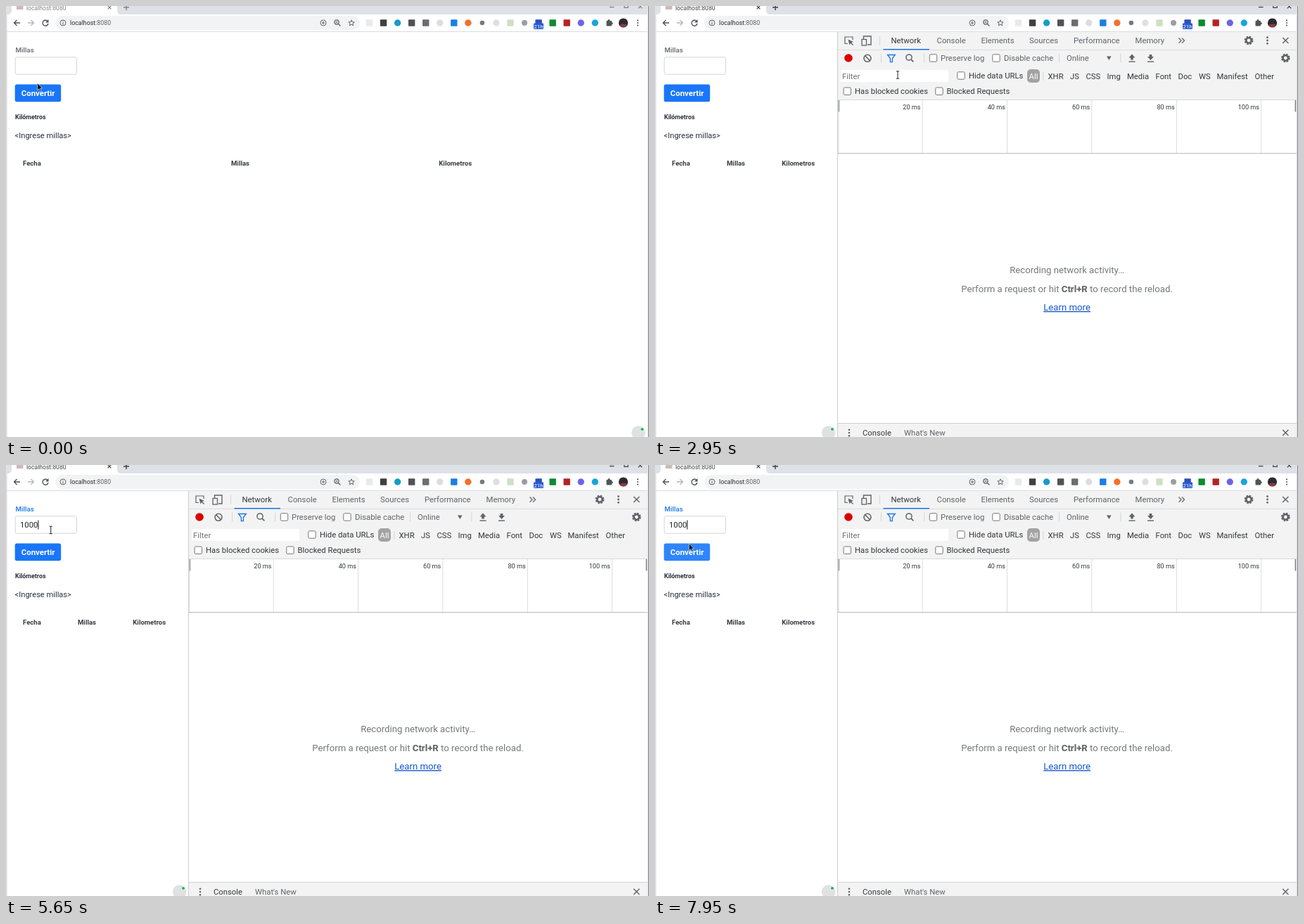
An HTML page that plays this animation: 914 by 613 pixels, repeating every 8000 ms.

```html
<!DOCTYPE html>
<html lang="es">
<head>
<meta charset="utf-8">
<title>Convertir millas</title>
<style>
  html, body { margin: 0; width: 100%; height: 100%; overflow: hidden; background: #fff; }
  svg { display: block; width: 914px; height: 613px; font-family: Roboto, "Noto Sans", sans-serif; }
  text { white-space: pre; }
</style>
</head>
<body>
<svg id="stage" viewBox="0 0 914 613"></svg>
<script>
const LOOP = 8000;
const GREY = '#5f6368', INK = '#333639', BAR = '#f3f3f3', RULE = '#cbcdd0', BLUE = '#1a73e8';
const BUTTON = '#1976f8', BUTTON_HOVER = '#2f85fb', LABEL = '#64696e', BODY = '#283039';

// Markup helpers
const text = (x, y, size, str, fill = INK, extra = '') =>
  `<text x="${x}" y="${y}" font-size="${size}" fill="${fill}" ${extra}>${str}</text>`;
const rect = (x, y, w, h, fill, extra = '') =>
  `<rect x="${x}" y="${y}" width="${w}" height="${h}" fill="${fill}" ${extra}/>`;
const circle = (x, y, r, fill, extra = '') =>
  `<circle cx="${x}" cy="${y}" r="${r}" fill="${fill}" ${extra}/>`;
const line = (d, stroke = GREY, width = 1.3, extra = '') =>
  `<path d="${d}" fill="none" stroke="${stroke}" stroke-width="${width}" ${extra}/>`;
const group = (id, body, extra = '') => `<g id="${id}" ${extra}>${body}</g>`;
const cross = (x, y, r, color = GREY, width = 1.4) =>
  line(`M${x - r} ${y - r}l${2 * r} ${2 * r}m0 ${-2 * r}l${-2 * r} ${2 * r}`, color, width);
const dots = (x, y, gap, r) => [-gap, 0, gap].map(d => circle(x, y + d, r, GREY)).join('');
const checkbox = (x, y) => rect(x - 5.2, y - 5.2, 10.4, 10.4, '#fff', 'rx="1.6" stroke="#767676" stroke-width="1"');
const gear = (x, y) => circle(x, y, 3.7, 'none', `stroke="${GREY}" stroke-width="2.6"`) +
  circle(x, y, 5.4, 'none', `stroke="${GREY}" stroke-width="2" stroke-dasharray="2.6 1.641"`);
const lens = (x, y, r, color = GREY, width = 1.4) =>
  circle(x - 1, y - 1, r, 'none', `stroke="${color}" stroke-width="${width}"`) +
  line(`M${x - 1 + r * .7} ${y - 1 + r * .7}L${x + r + 1.3} ${y + r + 1.3}`, color, width + .2);
const star = (x, y, r) => {
  const points = Array.from({ length: 10 }, (_, i) => {
    const a = i * Math.PI / 5 - Math.PI / 2, k = i % 2 ? r * .45 : r;
    return `${x + k * Math.cos(a)},${y + k * Math.sin(a)}`;
  });
  return `<polygon points="${points.join(' ')}" fill="none" stroke="${GREY}" stroke-width="1"/>`;
};

function extensions() {
  const square = (color, r = 4.7) => x => rect(x - r, 24 - r, 2 * r, 2 * r, color, 'rx="1"');
  const disc = (color, r = 4.7) => x => circle(x, 24, r, color);
  const icons = [square('#e9eaeb'), square('#3f4042'), disc('#159bc8'), square('#505254'), square('#6b6d70'),
    disc('#dcdddf'), square('#1b80e3'), disc('#f3702a'), disc('#777a7d', 3.3), disc('#dedfe0'), square('#cfe0c4'),
    disc('#9a9da1', 4), square('#2a50bd'), square('#0c8b30'), square('#b52424'), disc('#6d64e6'), disc('#18a5dc')];
  return icons.map((icon, i) => icon(516.5 + i * 20.05)).join('') +
    rect(750, 24.5, 14, 8.5, '#2a5bd0', 'rx="1"') + text(757, 31.7, 8, '21h', '#fff', 'text-anchor="middle"');
}

function browser() {
  return rect(0, 0, 914, 12, '#dee1e6') +
    '<path d="M2 12Q8 12 8 6V0H158V6Q158 12 164 12Z" fill="#fff"/>' +
    rect(15, 0, 9.5, 5, '#c9bcbd') +
    group('chrome', text(29, 5.7, 8.6, 'localhost:8080', 'currentColor') + cross(147, 2, 2.4, 'currentColor', 1.2) +
      line('M167 2H175M171 -2V6', 'currentColor', 1.4) +
      line('M858 1.7H864.5M878.8 -3V2.3H884.2V-3', 'currentColor', 1.2) + cross(901.5, .5, 2.8, 'currentColor', 1.2)) +
    rect(0, 12, 914, 24, '#fff') + rect(0, 36, 914, 1, '#dadce0') +
    rect(70, 14, 433, 20, '#f1f3f4', 'rx="10"') +
    line('M20 24H11.5M15.5 20L11.5 24L15.5 28', '#4d5156') +
    line('M31 24H39.5M35.5 20L39.5 24L35.5 28', '#b4b7ba') +
    line('M59 21.5A4 4 0 1 0 60 25', '#4d5156', 1.4) + '<path d="M60.5 19v4.4h-4.4z" fill="#4d5156"/>' +
    circle(81, 24, 4, 'none', `stroke="${GREY}"`) + line('M81 21.4v1.2M81 23.4v3', GREY, 1.1) +
    text(91, 27.3, 8.85, 'localhost<tspan fill="#5f6368">:8080</tspan>', '#2a2d31') +
    circle(451, 24, 4, 'none', `stroke="${GREY}"`) + line('M449 24h4M451 22v4', GREY, 1.1) +
    lens(471, 24, 3.1, GREY, 1.2) + line('M468.5 23h3M470 21.5v3', GREY, .8) +
    star(491, 24.3, 4.4) + extensions() +
    rect(853.5, 21, 7.5, 7.5, '#505459', 'rx="1"') + circle(857, 20.5, 1.5, '#505459') + circle(861.3, 24.7, 1.5, '#505459') +
    circle(877.5, 24, 6.6, '#2d2a33') + '<path d="M872 27.5Q877 24 883 27A6.6 6.6 0 0 1 872 27.5Z" fill="#8d3a39"/>' +
    dots(898, 24, 3.6, 1.1);
}

function page() {
  const bold = 'font-weight="700"';
  return text(13.5, 66.4, 9.7, 'Millas', LABEL, 'id="label" font-weight="500"') +
    rect(13.2, 72.8, 87.3, 24.4, '#fff', 'rx="2.5" stroke="#ced1d4" stroke-width=".9"') +
    text(20, 89, 11.3, '', '#212529', 'id="typed"') +
    rect(0, 78.5, 1, 13, '#111', 'id="caret"') +
    rect(12.7, 111.6, 65.5, 24.7, BUTTON, 'rx="2.8" id="button"') +
    text(45.6, 128, 11.4, 'Convertir', '#fff', bold + ' text-anchor="middle"') +
    text(13, 160.5, 8.9, 'Kilómetros', BODY, bold) +
    text(12.6, 188, 11.1, '&lt;Ingrese millas&gt;', BODY) +
    text(24, 226.6, 9.56, 'Fecha', '#363a3e', bold) +
    text(320, 226.6, 9.56, 'Millas', '#363a3e', bold + ' id="colMiles"') +
    text(615, 226.6, 9.56, 'Kilometros', '#363a3e', bold + ' id="colKm"') +
    group('badge', circle(0, 607, 9.8, '#dfe1e2') + circle(5.3, 602, 2.6, '#fff') + circle(5.3, 602, 2.1, '#20b45a'));
}

function devtools() {
  const tabs = [[335.5, 'Network'], [400.5, 'Console'], [463.5, 'Elements'], [532, 'Sources'], [595, 'Performance'], [682.5, 'Memory']];
  return rect(260, 37, 652, 576, '#fff') + rect(259, 37, 1, 576, RULE) +
    rect(260, 37, 652, 25, BAR) + rect(260, 62, 652, .8, RULE) +
    line('M274 53.5H270V44H281V48', GREY, 1.2) + '<path d="M274.5 47.5L282 51L279 52L282 55L281 56L278 53L276.5 55.5Z" fill="#5f6368"/>' +
    line('M296.5 47V43H307V55H302', GREY, 1.4) + rect(294, 47.5, 6.5, 8.5, BAR, `stroke="${GREY}" stroke-width="1.3"`) +
    rect(319, 43, .8, 13, RULE) + rect(324.5, 61, 65.5, 1.6, BLUE) +
    tabs.map(([x, s]) => text(x, 53, 11.35, s, x < 340 ? INK : GREY)).join('') +
    line('M744.5 45.5l3.5 3.7l-3.5 3.7M749 45.5l3.5 3.7l-3.5 3.7') +
    gear(844, 49) + dots(870.5, 49, 4.3, 1.4) + cross(896.3, 49, 4.1) +
    group('network', network()) +
    rect(260, 593, 652, 20, BAR) + rect(260, 593, 652, .9, RULE) + dots(276, 607, 4.2, 1.3) +
    text(295, 611, 11.3, 'Console') + text(354, 611, 11.3, "What's New", GREY) + cross(896.3, 606.8, 4.1);
}

function network() {
  const types = [[558.5, 'XHR'], [590, 'JS'], [612.5, 'CSS'], [642.5, 'Img'], [671, 'Media'], [711.5, 'Font'],
    [743.5, 'Doc'], [773, 'WS'], [798.5, 'Manifest'], [852.5, 'Other']];
  const arrow = (x, tip, dir) => `<path d="M${x} ${tip}l4.5 ${dir * 5}h-2.7v${dir * 3}h-3.6v${-dir * 3}h-2.7z" fill="${GREY}"/>` +
    rect(x - 4.5, 78.5, 9, 1.4, GREY);
  const ticks = [20, 40, 60, 80, 100].map((ms, i) => {
    const x = 379.7 + i * 120.4;
    return rect(x, 134, .8, 75, '#d3d5d7') + text(x - 2.2, 147, 9.15, ms + ' ms', INK, 'text-anchor="end"');
  }).join('');
  const center = (y, s, fill, extra = '') => text(585.6, y, 13.2, s, fill, 'text-anchor="middle" ' + extra);
  return rect(260, 62.8, 652, 71, BAR) +
    circle(275, 74, 5.8, '#db0000') +
    circle(302, 74.3, 5, 'none', `stroke="${GREY}" stroke-width="1.6"`) + line('M298.5 70.8l7 7', GREY, 1.6) +
    rect(321, 67.5, .8, 13, RULE) +
    line('M330.5 69.5H341.3L337.4 74.5V79.7H334.4V74.5Z', BLUE, 1.3) +
    lens(362, 74, 4.1, 'currentColor', 1.5) +
    rect(382.3, 67.5, .8, 13, RULE) +
    checkbox(395.5, 74) + text(406, 78.1, 11.3, 'Preserve log', GREY) +
    checkbox(485, 74) + text(496, 78.1, 11.3, 'Disable cache', GREY) +
    rect(574, 67.5, .8, 13, RULE) + text(585, 78.1, 11.3, 'Online', GREY) +
    `<path d="M642 71.5h6.6l-3.3 5.5z" fill="${GREY}"/>` +
    rect(661.5, 67.5, .8, 13, RULE) + arrow(678, 68.5, 1) + arrow(704.5, 77, -1) + gear(896.3, 74) +
    rect(264, 91, 153, 17, '#fff', 'id="filter"') + text(266, 104.2, 11.3, 'Filter', '#757575') +
    checkbox(435, 99) + text(446, 103, 11.3, 'Hide data URLs') +
    rect(529, 90, 18, 19, '#a3a3a3', 'rx="5"') + text(538, 104, 11.3, 'All', '#fff', 'text-anchor="middle"') +
    rect(551.5, 94, .8, 12, RULE) +
    types.map(([x, s]) => text(x, 104, 11.3, s)).join('') +
    checkbox(273.3, 121.2) + text(284, 125.2, 11.3, 'Has blocked cookies') +
    checkbox(404, 121.2) + text(414.5, 125.2, 11.3, 'Blocked Requests') +
    rect(260, 133.3, 652, .9, RULE) + rect(260, 134, 652, 75, '#fff') + ticks +
    rect(260.5, 134, 1.7, 16.5, '#818487') + rect(909.6, 134, 1.7, 16.5, '#818487') +
    rect(260.5, 134, .8, 75, RULE) + rect(260, 209, 652, 1.2, '#bec0c2') +
    center(380.4, 'Recording network activity…', '#757779') +
    center(406.6, 'Perform a request or hit <tspan font-weight="700" fill="#5d6063">Ctrl+R</tspan> to record the reload.', '#757779') +
    center(433, 'Learn more', '#1155cc', 'text-decoration="underline"');
}

const pointers =
  group('arrow', '<path d="M-.4 -.3v10l2.3 -2l1.7 3.5l1.6 -.7l-1.6 -3.4l3 -.3z" fill="#0a0a0a" stroke="#fff" stroke-width=".6"/>') +
  group('beam', line('M-2.2 -5.2H2.2M0 -5.2V5.2M-2.2 5.2H2.2', '#333', 1.1));

document.getElementById('stage').innerHTML = rect(0, 0, 914, 613, '#fff') + browser() + page() +
  group('devtools', devtools()) +
  rect(0, 12, 1.7, 601, '#dcdfe4') + rect(911.7, 12, 1.3, 601, '#dee1e6') + rect(913, 0, 1, 613, '#85888d') + pointers;

const el = id => document.getElementById(id);
const show = (id, on) => el(id).setAttribute('visibility', on ? 'inherit' : 'hidden');
const set = (id, name, value) => el(id).setAttribute(name, value);

// Pointer stops: time, x, y; the beam replaces the arrow over text fields
const stops = [
  [0, 45, 110], [850, 62, 112], [900, 105, 117], [950, 162, 124], [1000, 208, 129], [1050, 227.7, 131.7],
  [2800, 230.5, 131],
  [2950, 345, 98, 'beam'], [3100, 352, 97, 'beam'], [3250, 366, 77.5], [3400, 370, 77.5],
  [3600, 205, 105], [3700, 72, 126], [3800, 21.5, 130.5], [4000, 17, 123], [4100, 38, 113],
  [4250, 52, 102], [4500, 60, 88, 'beam'], [4750, 62, 91, 'beam'], [4850, 63.7, 92.5, 'beam'],
  [5900, 0, 0, 'none'], [6050, 56, 94, 'beam'], [6200, 50, 127], [6400, 86, 142],
  [6700, 68, 128], [6800, 54, 122], [6900, 48, 120], [7000, 60, 124],
  [7200, 291.7, 213.7], [7300, 352, 243], [7350, 396, 262], [7450, 393, 262],
  [7650, 305, 222], [7750, 180, 168], [7850, 86, 128], [7950, 48.7, 112]
];
const keys = [5150, 5250, 5400, 5500];
const within = (t, a, b) => t >= a && t < b;

function draw(t) {
  const [, x, y, kind = 'arrow'] = stops.findLast(s => s[0] <= t);
  for (const id of ['arrow', 'beam']) {
    show(id, id === kind);
    set(id, 'transform', `translate(${x} ${y})`);
  }
  const focused = t >= 1250;
  const hover = focused && kind === 'arrow' && x >= 13 && x <= 78 && y >= 112 && y <= 136;
  set('button', 'fill', hover ? BUTTON_HOVER : BUTTON);
  set('chrome', 'color', focused ? '#3c4043' : '#7f8388');

  const panel = t >= 2250;
  show('devtools', panel);
  show('network', t >= 2950);
  set('network', 'color', within(t, 3250, 3600) ? '#202124' : GREY);
  set('filter', 'stroke', within(t, 3100, 3250) ? '#d5d7d9' : 'none');
  set('colMiles', 'x', panel ? 102 : 320);
  set('colKm', 'x', panel ? 180.3 : 615.3);
  set('badge', 'transform', `translate(${panel ? 246.7 : 899} 0)`);

  const typed = '1000'.slice(0, keys.filter(k => k <= t).length);
  el('typed').textContent = typed;
  set('caret', 'x', 20 + typed.length * 6.35);
  show('caret', t >= 4500 && !within(t, 6200, 6700) && !within(t, 7300, 7750));
  set('label', 'fill', t < 4500 ? LABEL : t < 4750 ? '#4b6f9f' : t < 4850 ? '#2e74d0' : '#1976e8');
}

const start = performance.now();
function tick() {
  draw((performance.now() - start) % LOOP);
  requestAnimationFrame(tick);
}
tick();
</script>
</body>
</html>
```
